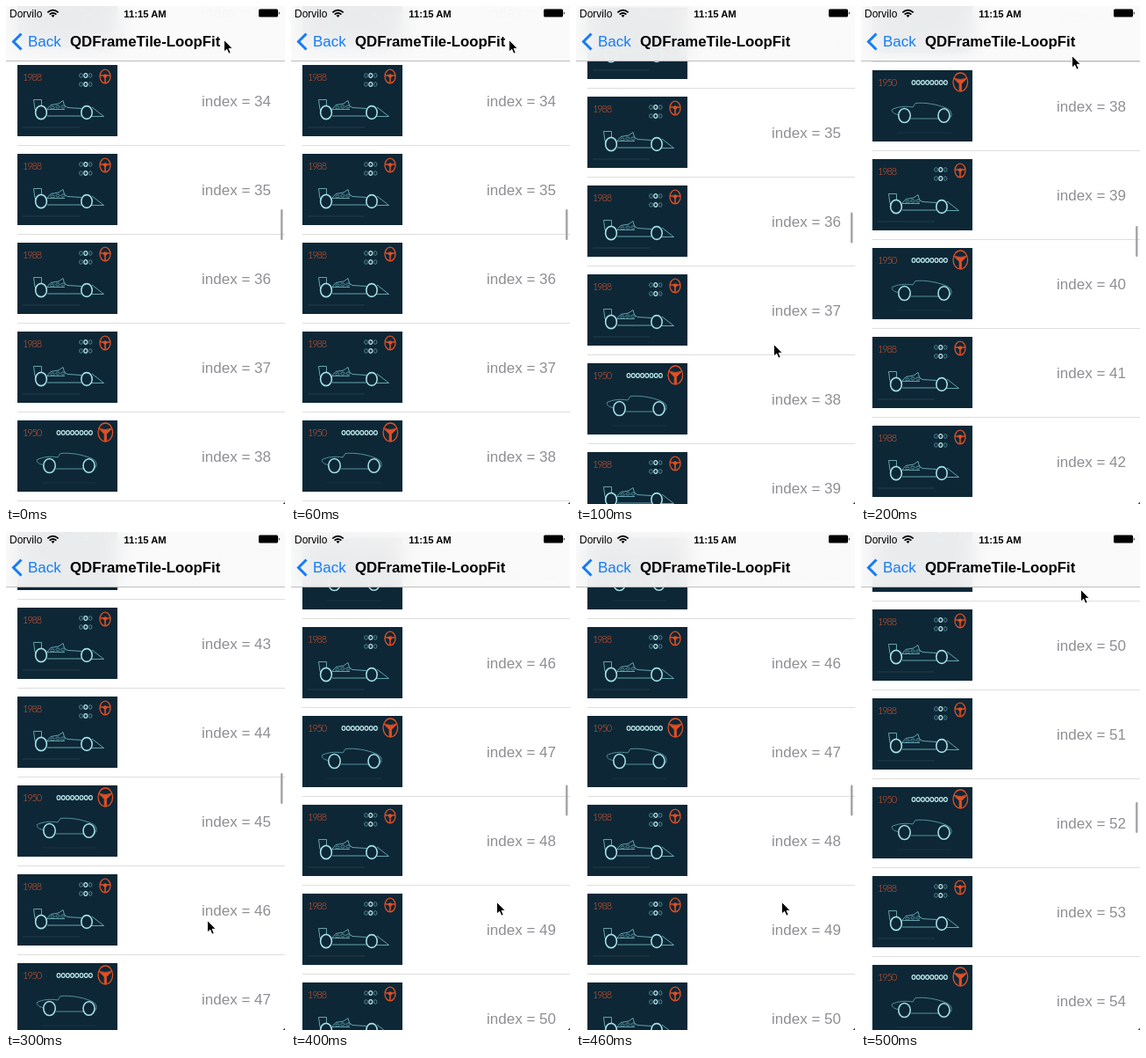
Write an HTML page that moves like this. It is 318 px wide and 566 px high and loops after 600 ms.

```html
<!DOCTYPE html>
<html lang="en">
<head>
<meta charset="utf-8">
<title>Scrolling list</title>
<style>
html, body { margin: 0; width: 100%; height: 100%; overflow: hidden; background: #fff; }
#stage { position: relative; width: 318px; height: 566px; overflow: hidden; background: #fff; }
#stage > * { position: absolute; left: 0; top: 0; }
svg { display: block; font-family: "Liberation Sans", Arial, sans-serif; }
#nav {
  width: 318px; height: 63px;
  background: rgba(250, 250, 250, .93);
  -webkit-backdrop-filter: blur(12px);
  backdrop-filter: blur(12px);
}
.label { font-size: 17px; fill: #8e8e93; text-anchor: end; }
.year { font: 300 11px Lato, sans-serif; letter-spacing: -1.1px; fill: #e2562c; }
.line { fill: none; stroke: #6fb3bd; stroke-width: .9; stroke-linejoin: round; }
.dim { stroke: #5c9ca8; }
.tyre { fill: #0d2736; stroke: #a2dfe4; stroke-width: 1.6; }
.knob { fill: none; stroke: #5f97a2; stroke-width: .8; }
.lit { stroke: #b9e6ea; stroke-width: 1.2; }
.helm { fill: none; stroke: #e04f24; stroke-width: 1.3; }
.helm .hub { fill: #e04f24; stroke-width: .8; }

#rows, #bar, #cursor { animation: .6s step-end infinite; }
#rows { animation-name: scroll; }
#bar { animation-name: bar; }
#cursor { animation-name: cursor; }
@keyframes scroll {
  0% { transform: translateY(-3366px); }
  16.66% { transform: translateY(-3431px); }
  33.33% { transform: translateY(-3764px); }
  50% { transform: translateY(-4256px); }
  66.66% { transform: translateY(-4537px); }
  83.33%, 100% { transform: translateY(-4961px); }
}
@keyframes bar {
  0% { transform: translateY(231px); }
  16.66% { transform: translateY(234.5px); }
  33.33% { transform: translateY(250px); }
  50% { transform: translateY(274px); }
  66.66% { transform: translateY(287.5px); }
  83.33%, 100% { transform: translateY(307px); }
}
@keyframes cursor {
  0% { transform: translate(248px, 38px); }
  16.66% { transform: translate(225px, 384px); }
  33.33% { transform: translate(240px, 56px); }
  50% { transform: translate(229px, 441px); }
  66.66% { transform: translate(234px, 420px); }
  83.33%, 100% { transform: translate(250px, 65px); }
}
</style>
</head>
<body>
<div id="stage">
  <svg width="318" height="566">
    <defs>
      <g id="modern">
        <rect width="114" height="81" fill="#0d2736"/>
        <text class="year" x="6" y="17.5">1988</text>
        <g id="knobs6"></g>
        <g class="helm">
          <ellipse cx="100" cy="13" rx="6" ry="7.8"/>
          <path d="M94.5 12H105.5M100 12V20.5" stroke-width="1.6"/>
          <ellipse class="hub" cx="100" cy="12.5" rx="2" ry="1.8"/>
        </g>
        <path class="line" d="M20 50.500L18.500 39.500H27.500V46.500M20 50.500H23M34 50L38 45.500L47 44L52 40.500L53.500 46L57 48.500L73 49.500M85 48L98.500 58.500H84M34 58H73M34 50.500H54"/>
        <g class="line dim">
          <ellipse cx="40" cy="48.500" rx="2.200" ry="1.500"/>
          <ellipse cx="46" cy="47.500" rx="2.200" ry="1.500"/>
          <ellipse cx="52" cy="47.500" rx="2.200" ry="1.500"/>
        </g>
        <ellipse class="tyre" cx="27" cy="54" rx="6.400" ry="7.600"/>
        <ellipse class="tyre" cx="79" cy="54" rx="6.200" ry="7.400"/>
        <path d="M6 71H71" stroke="#274350" stroke-width=".8"/>
      </g>
      <g id="classic">
        <rect width="114" height="81" fill="#0d2736"/>
        <text class="year" x="6" y="17.5">1950</text>
        <g id="knobs8"></g>
        <g class="helm">
          <ellipse cx="100.300" cy="13.500" rx="8.300" ry="10.500"/>
          <path class="hub" d="M92.500 9Q100.300 12 108 9L101.500 15.500V23.500H99.100V15.500Z"/>
        </g>
        <path class="line dim" d="M29 50.500C24 49.500 21.500 47 22.500 44.500C29 41.500 37 40.500 46 42L49 37.500C60 36.500 73 38.500 84 43C88 44.500 90 47 90 50.500C90 53 89 54 87 55M44 55H75"/>
        <ellipse class="tyre" cx="36.500" cy="51.500" rx="6.700" ry="8"/>
        <ellipse class="tyre" cx="81.500" cy="51.500" rx="6.500" ry="7.800"/>
        <path d="M28 71H90" stroke="#1b3744" stroke-width=".8"/>
      </g>
    </defs>
    <g id="rows"></g>
    <rect id="bar" x="313" width="2.500" height="35" rx="1.250" fill="#a6a6aa"/>
  </svg>

  <div id="nav"></div>

  <svg width="318" height="566">
    <path d="M0 62.500H318" stroke="#bdbdc0"/>
    <text x="4" y="13" font-size="12">Dorvilo</text>
    <g fill="none" stroke="#000" stroke-width="1.700">
      <path d="M47.300 7.300Q53.500 1.800 59.700 7.300M49.600 9.700Q53.500 6.300 57.400 9.700"/>
      <path d="M51.500 10.800Q53.500 9.300 55.500 10.800L53.500 13Z" fill="#000" stroke="none"/>
    </g>
    <text x="158.500" y="13" font-size="11.300" font-weight="bold" text-anchor="middle">11:15 AM</text>
    <rect x="288" y="3.500" width="22" height="9" rx="1.500"/>
    <path d="M310.800 6.200Q312.800 8 310.800 9.800Z"/>
    <path d="M17.500 31.500L8.500 40.500L17.500 49.500" fill="none" stroke="#157cf8" stroke-width="3"/>
    <text x="25" y="46" font-size="17" fill="#157cf8">Back</text>
    <text x="73" y="46" font-size="16.800" font-weight="bold">QDFrameTile-LoopFit</text>
    <path d="M318 563.500V566H315.500Z" fill="#444"/>
    <path id="cursor" d="M.5 .5V14L3.700 11.200L5.900 16.200L8.200 15.200L6.100 10.300H10.200Z" fill="#000" stroke="#fff" stroke-width=".9"/>
  </svg>
</div>
<script>
const byId = id => document.getElementById(id);
const PITCH = 101;

const knob = (x, y, lit) =>
  `<ellipse class="knob${lit ? " lit" : ""}" cx="${x}" cy="${y}" rx="1.9" ry="2.3"/>`;

const knobs = (count, perRow, x, y, step, isLit) =>
  Array.from({ length: count }, (_, i) =>
    knob(x + i % perRow * step, y + Math.floor(i / perRow) * 10, isLit(i))).join("");

byId("knobs6").innerHTML = knobs(6, 3, 72.5, 12, 5.3, i => i % 3 === 1);
byId("knobs8").innerHTML = knobs(8, 8, 47, 14, 5.2, () => true);

function row(i) {
  const car = [3, 5].includes(i % 7) ? "classic" : "modern";
  return `<g transform="translate(0 ${i * PITCH})">
    <use href="#${car}" x="13" y="-1"/>
    <text class="label" x="302" y="45.5">index = ${i}</text>
    <path d="M13 90.5H318" stroke="#dededf"/>
  </g>`;
}

let list = "";
for (let i = 33; i <= 55; i++) list += row(i);
byId("rows").innerHTML = list;
</script>
</body>
</html>
```
